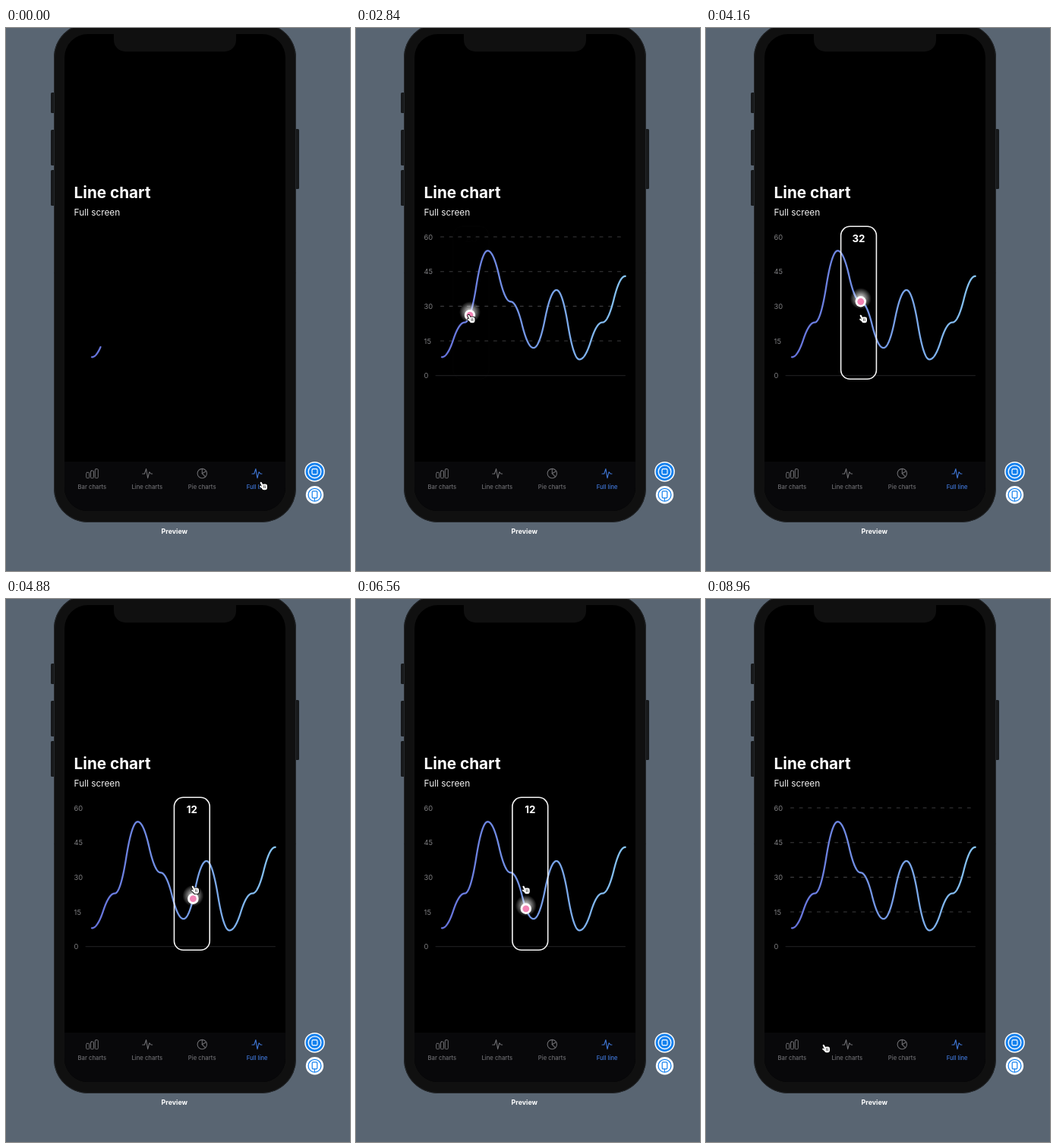
An HTML page with a canvas for the animation above (9000 ms loop, 453 px wide and 715 px high).

```html
<!DOCTYPE html>
<html lang="en">
<head>
<meta charset="utf-8">
<title>Line chart</title>
<style>
html, body { margin: 0; width: 100%; height: 100%; overflow: hidden; background: #596572; }
canvas { display: block; width: 453px; height: 715px; }
</style>
</head>
<body>
<canvas id="stage"></canvas>
<script>
const W = 453, H = 715, LOOP = 9000;
const canvas = document.getElementById('stage');
const ctx = canvas.getContext('2d');
const dpr = window.devicePixelRatio || 1;
canvas.width = W * dpr;
canvas.height = H * dpr;

const FONT = 'Inter, "Open Sans", sans-serif';
const GREY = '#6d6d71', BLUE = '#4078da', BUTTON_BLUE = '#1481ee', BODY = '#101010';

const values = [8, 23, 54, 32, 12, 37, 7, 23, 43];
const LEFT = 113, STEP = 30.2, RIGHT = LEFT + STEP * (values.length - 1);
const BASE = 457.7, UNIT = 3.045;

const TOUCH = 2840, TURN = 5490, RELEASE = 6950;
const tab = { x: 339, y: 603 }, rest = { x: 210, y: 380 }, exit = { x: 158, y: 592 };

const clamp = v => Math.min(1, Math.max(0, v));
const easeOut = v => 1 - (1 - clamp(v)) ** 1.72;

function glide(a, b, v) {
  v = clamp(v);
  v = v * v * (3 - 2 * v);
  return { x: a.x + (b.x - a.x) * v, y: a.y + (b.y - a.y) * v };
}

// the finger swings right until TURN, then back
function drag(t) {
  const swing = Math.cos(Math.PI * (t - TURN) / (TURN - TOUCH));
  return { x: 151.5 + 55.7 * (1 + swing), y: 383 };
}

function cursorAt(t) {
  if (t < TOUCH) return glide(tab, drag(TOUCH), (t - 700) / 1100);
  if (t < RELEASE) return drag(t);
  if (t < 7900) return glide(drag(RELEASE), rest, (t - RELEASE) / 600);
  return glide(rest, exit, (t - 7900) / 1060);
}

const valueY = v => BASE - v * UNIT;

function curveY(x) {
  const p = Math.min(values.length - 1, Math.max(0, (x - LEFT) / STEP));
  const i = Math.min(values.length - 2, Math.floor(p));
  const u = p - i, a = values[i], d = values[i + 1] - a;
  return valueY(a + d * (u < 0.5 ? 2 * u * u : 1 - 2 * (1 - u) ** 2));
}

const curve = [];
for (let x = LEFT, len = 0; x <= RIGHT + 0.01; x += STEP / 100) {
  const y = curveY(x), last = curve[curve.length - 1];
  if (last) len += Math.hypot(x - last.x, y - last.y);
  curve.push({ x, y, len });
}
const curveLength = curve[curve.length - 1].len;

function text(str, x, y, size, weight, color, align = 'left') {
  ctx.font = `${weight} ${size}px ${FONT}`;
  ctx.textAlign = align;
  ctx.fillStyle = color;
  ctx.fillText(str, x, y);
}

function pen(color, width) {
  ctx.strokeStyle = color;
  ctx.lineWidth = width;
  ctx.stroke();
}

function fillBox(x, y, w, h, r, color) {
  ctx.beginPath();
  ctx.roundRect(x, y, w, h, r);
  ctx.fillStyle = color;
  ctx.fill();
}

function strokeBox(x, y, w, h, r, color, width) {
  ctx.beginPath();
  ctx.roundRect(x, y, w, h, r);
  pen(color, width);
}

function disc(x, y, r, color) {
  ctx.beginPath();
  ctx.arc(x, y, r, 0, Math.PI * 2);
  ctx.fillStyle = color;
  ctx.fill();
}

function ring(x, y, r, color, width) {
  ctx.beginPath();
  ctx.arc(x, y, r, 0, Math.PI * 2);
  pen(color, width);
}

function line(x1, y1, x2, y2, color, width) {
  ctx.beginPath();
  ctx.moveTo(x1, y1);
  ctx.lineTo(x2, y2);
  pen(color, width);
}

function phone() {
  const sideKey = (x, y, h) => fillBox(x, y, 6, h, 1.5, '#17191b');
  sideKey(59, 85, 27);
  sideKey(59, 134, 47);
  sideKey(59, 187, 47);
  sideKey(380, 133, 79);

  fillBox(63, -6, 319, 657, 45, BODY);
  strokeBox(63.5, -5.5, 318, 656, 44.5, '#24272a', 1);
  fillBox(77, 8, 291, 628, 31, '#000');
  fillBox(77, 571, 291, 65, [0, 0, 31, 31], '#08080a');
  fillBox(142, 4, 161, 27, [0, 0, 15, 15], BODY);
}

function pulse(x, color) {
  const y = 587;
  ctx.beginPath();
  ctx.moveTo(x - 6.5, y);
  [0, -6.5, 5.6, -2.3, 0].forEach((dy, i) => ctx.lineTo(x - 3.7 + i * 2.1, y + dy));
  ctx.lineTo(x + 6.5, y);
  pen(color, 1.1);
}

function tabs() {
  ctx.lineJoin = ctx.lineCap = 'round';
  for (let i = 0; i < 3; i++) {
    const top = 585.3 - i * 2.3;
    strokeBox(105.7 + i * 5.8, top, 4, 592.6 - top, 1, GREY, 1);
  }
  const cx = 258.3, cy = 586.6, r = 6.2;
  ring(cx, cy, r, GREY, 1.1);
  for (const a of [-90, -30, 45]) {
    const rad = a * Math.PI / 180;
    line(cx, cy, cx + r * Math.cos(rad), cy + r * Math.sin(rad), GREY, 1.1);
  }
  pulse(186.2, GREY);
  pulse(330.5, BLUE);
  ['Bar charts', 'Line charts', 'Pie charts', 'Full line'].forEach((name, i) =>
    text(name, 113.4 + i * 72.4, 606.8, 7.7, 500, i === 3 ? BLUE : GREY, 'center'));
}

function previewButtons() {
  const x = 406.5;
  disc(x, 584.2, 13.3, '#fff');
  disc(x, 584.2, 11.8, BUTTON_BLUE);
  ring(x, 584.2, 8.3, '#fff', 1.3);
  strokeBox(x - 3.5, 580.7, 7, 7, 1.5, '#fff', 1.2);

  disc(x, 614.7, 11.7, '#fff');
  ring(x, 614.7, 8.4, BUTTON_BLUE, 1.3);
  strokeBox(x - 3.3, 609.8, 6.6, 9, 1.3, BUTTON_BLUE, 1.2);
  line(x, 619, x, 622.5, BUTTON_BLUE, 1);
}

function legend(t, grid) {
  const alpha = easeOut((t - 980) / 1000);
  if (!alpha) return;
  ctx.lineCap = 'round';
  for (let v = 0; v <= 60; v += 15) {
    const y = valueY(v);
    ctx.globalAlpha = alpha;
    text(String(v), 89.6, y + 3.6, 9.3, 400, '#7e7e81');
    if (v) {
      ctx.globalAlpha = alpha * grid;
      ctx.setLineDash([4, 7.64]);
      line(111.5, y, 350, y, '#3c3c3e', 1.1);
      ctx.setLineDash([]);
    } else {
      line(105, y, 354.5, y, '#232325', 1);
    }
  }
  ctx.globalAlpha = 1;
}

function chartLine(t) {
  const shown = easeOut((t + 20) / 1200) * curveLength;
  const paint = ctx.createLinearGradient(LEFT, 0, RIGHT, 0);
  paint.addColorStop(0, '#6672dc');
  paint.addColorStop(1, '#84c2f0');
  ctx.lineCap = ctx.lineJoin = 'round';
  ctx.beginPath();
  for (const p of curve) {
    if (p.len > shown) break;
    ctx.lineTo(p.x, p.y);
  }
  pen(paint, 2.3);
}

function indicator(x) {
  const y = curveY(x);
  const glow = ctx.createRadialGradient(x, y - 4, 3, x, y - 4, 14);
  glow.addColorStop(0, 'rgba(255,255,255,.75)');
  glow.addColorStop(0.5, 'rgba(255,255,255,.36)');
  glow.addColorStop(1, 'rgba(255,255,255,0)');
  disc(x, y - 4, 14, glow);
  disc(x, y, 7.2, '#fff');
  disc(x, y, 4.4, '#f283b4');
}

function magnifier(x, number, alpha) {
  ctx.globalAlpha = alpha;
  strokeBox(x - 23.4, 261.3, 46.8, 201, 12, '#f4f4f4', 1.6);
  text(String(number), x, 281.7, 13.3, 700, '#fff', 'center');
  ctx.globalAlpha = 1;
}

function hand(x, y) {
  ctx.save();
  ctx.translate(x, y);
  ctx.lineCap = 'round';
  // outline first, then the white shape
  for (const [color, grow] of [['#000', 1.6], ['#fff', 0]]) {
    line(-3.2, -4.2, -0.6, 1, color, 2.2 + grow);
    line(-3.8, 0.6, -0.6, 3, color, 2 + grow);
    fillBox(-2 - grow / 2, -2.4 - grow / 2, 7 + grow, 7.6 + grow, 2.4, color);
  }
  for (const dx of [0.4, 2.2]) line(dx, -0.4, dx + 0.3, 2.6, '#222', 0.7);
  ctx.restore();
}

function draw(t) {
  ctx.setTransform(dpr, 0, 0, dpr, 0, 0);
  ctx.fillStyle = '#596572';
  ctx.fillRect(0, 0, W, H);
  phone();
  tabs();
  previewButtons();
  text('Preview', 221.8, 665.7, 8.8, 700, '#fff', 'center');
  text('Line chart', 89.6, 223.8, 20.7, 700, '#fff');
  text('Full screen', 89.6, 247.2, 11.8, 400, '#f2f2f2');

  const focus = easeOut((t - TOUCH) / 200) * (1 - easeOut((t - RELEASE) / 200));
  legend(t, 1 - focus);
  chartLine(t);

  // dot and frame trail slightly behind the finger
  const held = Math.min(t, RELEASE);
  const trail = lag => drag(Math.max(TOUCH, held - lag)).x;
  const dotX = trail(25) - 1.5;
  if (t >= TOUCH && t < RELEASE) indicator(dotX);
  if (focus > 0) {
    magnifier(trail(90), values[Math.round((dotX - LEFT) / STEP)], focus);
  }

  const c = cursorAt(t);
  hand(c.x, c.y);
}

const start = performance.now();
function tick() {
  draw((performance.now() - start) % LOOP);
  requestAnimationFrame(tick);
}
tick();
</script>
</body>
</html>
```
